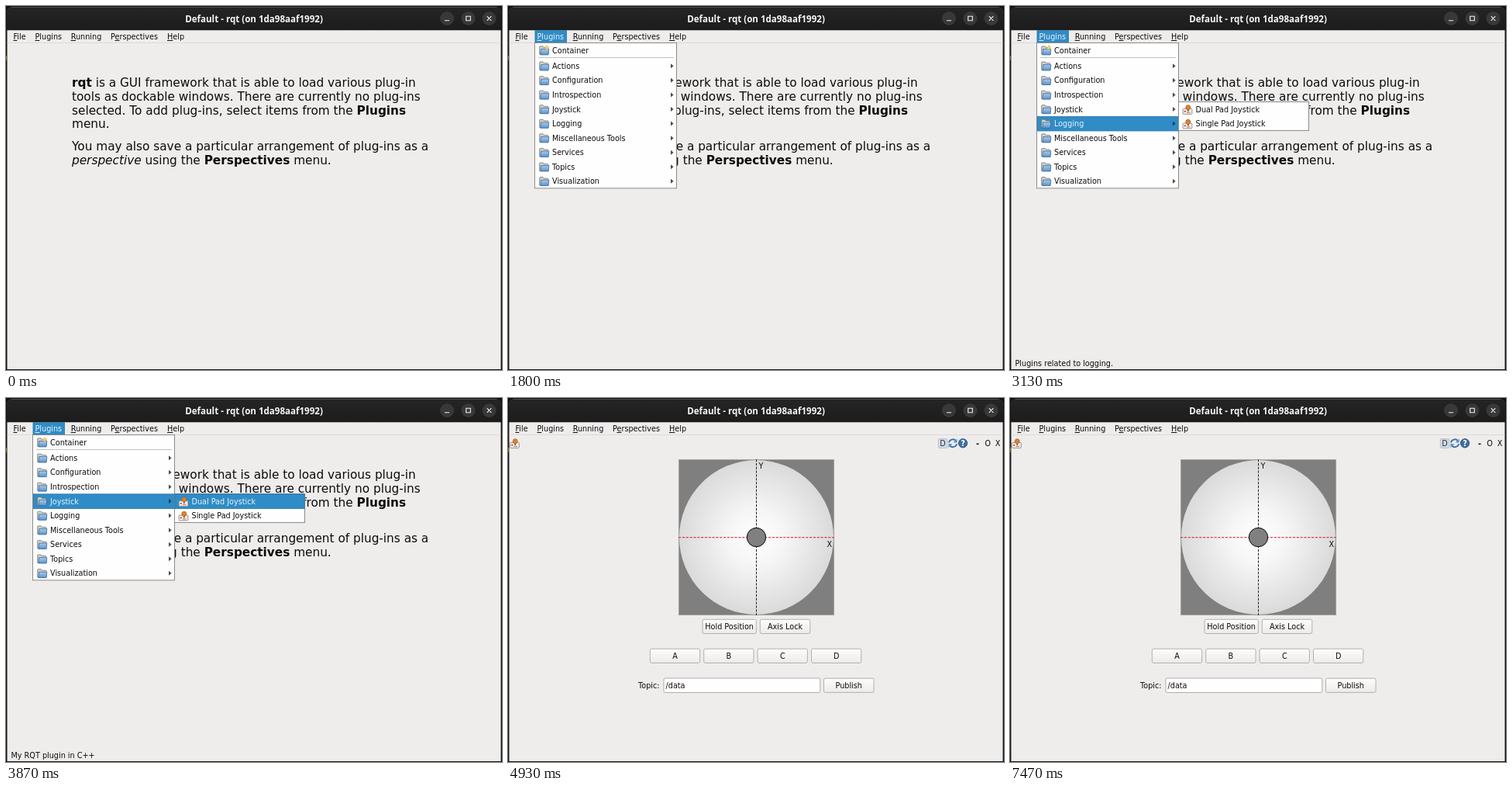
Animation of 640 by 469 pixels, one loop 8000 ms. Source, as an HTML page:

```html
<!DOCTYPE html>
<html lang="en">
<head>
<meta charset="utf-8">
<title>rqt joystick plugin</title>
<style>
  html, body { margin: 0; width: 100%; height: 100%; overflow: hidden; background: #121110; }
  svg { display: block; width: 640px; height: 469px; }
  text { font: 9.66px "DejaVu Sans", sans-serif; fill: #0c0c0c; white-space: pre; }
  .title { font: bold 11.57px "Open Sans", sans-serif; fill: #f6f6f6; }
  .welcome text { font-size: 15.3px; }
  .key { text-decoration: underline; text-decoration-thickness: .8px; }
  .mid { text-anchor: middle; }
  .bold { font-weight: bold; }
  .italic { font-style: italic; }
  .hot text { fill: #e9f3fa; }
  .bar { fill: #308cc6; stroke: #2774a6; stroke-width: .8; visibility: hidden; }
  .hot .bar { visibility: visible; }
  .hot .arrow { fill: #1b3f58; }
  .arrow { fill: #4a4a4a; }
  .popup { fill: #fefefe; stroke: #8d8b8a; }
  .button { fill: url(#face); stroke: #adaaa8; stroke-width: .9; }
</style>
</head>
<body>
<svg viewBox="0 0 640 469" xmlns="http://www.w3.org/2000/svg">
  <defs>
    <linearGradient id="titlebar" x2="0" y2="1">
      <stop stop-color="#252525"/><stop offset="1" stop-color="#1c1c1c"/>
    </linearGradient>
    <linearGradient id="face" x2="0" y2="1">
      <stop stop-color="#fdfdfc"/><stop offset="1" stop-color="#ecebe9"/>
    </linearGradient>
    <linearGradient id="folderFront" x2="0" y2="1">
      <stop stop-color="#a9cbec"/><stop offset="1" stop-color="#5b92c9"/>
    </linearGradient>
    <radialGradient id="pad">
      <stop stop-color="#ffffff"/><stop offset=".35" stop-color="#f6f6f6"/><stop offset="1" stop-color="#dadada"/>
    </radialGradient>
    <g id="folder">
      <path d="M.7 11V1.6q0-.9.9-.9h3.6l1.2 1.6h4.6q.8 0 .8.8V11z" fill="#d2d2cf" stroke="#6f716e" stroke-width=".8"/>
      <path d="M2.6 4.3h10.2l-.7 7.4H1.8z" fill="url(#folderFront)" stroke="#3a699b" stroke-width=".8"/>
    </g>
    <g id="stick">
      <rect x=".6" y="5.4" width="11.8" height="7" rx="1" fill="#f2eee9" stroke="#8f8a86" stroke-width=".9"/>
      <path d="M7.3 5v4" stroke="#6b5548" stroke-width="1.6"/>
      <circle cx="7.3" cy="3.7" r="3" fill="#e0822c" stroke="#a9541a" stroke-width=".7"/>
      <circle cx="3.3" cy="8.8" r="1.1" fill="#c33d2c"/>
      <path d="M5.6 10.4h4.2" stroke="#c06a3c"/>
    </g>
  </defs>

  <path d="M1.5 468V8q0-6.5 6.5-6.5h624q6.500 0 6.500 6.500V468z" fill="#efedec"/>
  <path d="M1 31.300V8q0-6.500 6.500-6.500h625q6.500 0 6.500 6.500v23.300z" fill="url(#titlebar)"/>
  <rect y="64" width="1" height="6" fill="#7a6420"/>
  <text class="title mid" x="320" y="21">Default - rqt (on 1da98aaf1992)</text>
  <g fill="#383838">
    <circle cx="569" cy="16" r="9"/><circle cx="596.500" cy="16" r="9"/><circle cx="623.500" cy="16" r="9"/>
  </g>
  <path d="M566 18.700h6M593.700 13.200h5.600v5.600h-5.600zM620.700 13.200l5.600 5.600m0-5.600l-5.600 5.600"
        fill="none" stroke="#f4f4f4" stroke-width="1.100"/>
  <path d="M1.500 47.500h637" stroke="#d9d7d5" stroke-width=".8"/>
  <g id="menubar"></g>

  <g id="welcome" class="welcome">
    <text x="85" y="104"><tspan class="bold">rqt</tspan> is a GUI framework that is able to load various plug-in</text>
    <text x="85" y="121.800">tools as dockable windows. There are currently no plug-ins</text>
    <text x="85" y="139.500">selected. To add plug-ins, select items from the <tspan class="bold">Plugins</tspan></text>
    <text x="85" y="157.300">menu.</text>
    <text x="85" y="185.700">You may also save a particular arrangement of plug-ins as a</text>
    <text x="85" y="203.500"><tspan class="italic">perspective</tspan> using the <tspan class="bold">Perspectives</tspan> menu.</text>
  </g>

  <g id="plugin">
    <use href="#stick" x="2" y="52"/>
    <rect x="555.300" y="52.500" width="11.600" height="12" rx="1.500" fill="#d5dade" stroke="#b4b8bb" stroke-width=".8"/>
    <text class="mid" x="561" y="62" style="fill:#173a5e">D</text>
    <g fill="none" stroke="#3b72aa" stroke-width="1.900">
      <path d="M569 57.500a5 4.600 0 0 1 8.800-2.500M579 59a5 4.600 0 0 1-8.800 2.500"/>
    </g>
    <path d="M579.500 52.500v5h-5zM568.500 64v-5h5z" fill="#5b94cc"/>
    <circle cx="587" cy="58.300" r="5.700" fill="#3f6fa3" stroke="#24486f" stroke-width=".8"/>
    <text class="mid bold" x="587" y="61.800" style="fill:#fff">?</text>
    <text class="mid bold" x="606" y="62">-</text>
    <text class="mid" x="619" y="62">O</text>
    <text class="mid" x="632" y="62">X</text>

    <rect x="220.300" y="79.300" width="200.400" height="200.400" fill="#7f7f7f" stroke="#a5a5a5" stroke-width=".7"/>
    <circle cx="320.500" cy="179.500" r="99.500" fill="url(#pad)"/>
    <path d="M320.500 79v201" stroke="#222" stroke-dasharray="3.220 1.610"/>
    <path d="M220 179.700h201" stroke="#d01c30" stroke-dasharray="3.220 1.610"/>
    <text x="323.500" y="91">Y</text>
    <text x="411.500" y="192">X</text>
    <circle id="knob" cx="320.500" cy="179.500" r="12.200" fill="#808080" stroke="#0a0a0a"/>

    <g id="buttons"></g>
    <text x="168" y="374">Topic:</text>
    <rect x="201" y="361" width="201.800" height="18.500" rx="2" fill="#fff" stroke="#a8a5a3" stroke-width=".9"/>
    <text x="203.500" y="374">/data</text>
  </g>

  <g id="menu"><rect class="popup" x="34.500" y="47.500" width="183" height="187.300"/></g>
  <g id="submenu"><rect class="popup" x="217.500" y="123.500" width="168" height="37"/></g>
  <text id="status" x="6.500" y="463.500"></text>
</svg>
<script>
const LOOP = 8000;
const ROW = 18.57;
const $ = id => document.getElementById(id);

function add(parent, tag, attrs = {}, text = '') {
  const node = document.createElementNS('http://www.w3.org/2000/svg', tag);
  for (const [name, value] of Object.entries(attrs)) node.setAttribute(name, value);
  node.textContent = text;
  return parent.appendChild(node);
}

function addMenuTitle(label, x, keyIndex = 0) {
  const group = add($('menubar'), 'g');
  if (label === 'Plugins') add(group, 'rect', { class: 'bar', x: 35, y: 31.7, width: 40.5, height: 15.6 });
  const text = add(group, 'text', { x, y: 43 });
  add(text, 'tspan', {}, label.slice(0, keyIndex));
  add(text, 'tspan', { class: 'key' }, label[keyIndex]);
  add(text, 'tspan', {}, label.slice(keyIndex + 1));
  return group;
}

function addRow(menu, label, left, width, middle, icon) {
  const group = add(menu, 'g');
  add(group, 'rect', { class: 'bar', x: left + .4, y: middle - 9.2, width, height: ROW });
  add(group, 'use', { href: icon, x: left + 5, y: middle - 6 });
  add(group, 'text', { x: left + 22, y: middle + 3.5 }, label);
  return group;
}

function addButton(label, x, y, width) {
  add($('buttons'), 'rect', { class: 'button', x, y, width, height: 18.2, rx: 2 });
  add($('buttons'), 'text', { class: 'mid', x: x + width / 2, y: y + 12.8 }, label);
}

addMenuTitle('File', 9.5);
const pluginsTitle = addMenuTitle('Plugins', 37.5);
addMenuTitle('Running', 83.7);
addMenuTitle('Perspectives', 135, 1);
addMenuTitle('Help', 208);

const rows = { Container: addRow($('menu'), 'Container', 35, 182, 57.2, '#folder') };
add(rows.Container, 'path', { d: 'M50 50.500l1 2 2 .3-1.500 1.500.4 2.200-1.900-1-1.900 1 .4-2.200-1.500-1.500 2-.3z', fill: '#f3d672', stroke: '#c79a35', 'stroke-width': .4 });
add($('menu'), 'path', { d: 'M39 66.500h175', stroke: '#c2c0bf' });
['Actions', 'Configuration', 'Introspection', 'Joystick', 'Logging',
  'Miscellaneous Tools', 'Services', 'Topics', 'Visualization'].forEach((label, i) => {
  const middle = 77.3 + i * ROW;
  rows[label] = addRow($('menu'), label, 35, 182, middle, '#folder');
  add(rows[label], 'path', { class: 'arrow', d: `M210 ${middle - 3}l3.600 3-3.600 3z` });
});
['Dual', 'Single'].forEach((name, i) => {
  rows[name] = addRow($('submenu'), `${name} Pad Joystick`, 217.5, 167.2, 133 + i * ROW, '#stick');
});

addButton('Hold Position', 251, 285.3, 69.3);
addButton('Axis Lock', 325.3, 285.3, 64.5);
['A', 'B', 'C', 'D'].forEach((label, i) => addButton(label, 183.3 + i * 69.4, 323.2, 64.3));
addButton('Publish', 407.5, 361.2, 64.5);

// Hovered menu row from each time on
const hovers = [
  [0, ''], [2070, 'Container'], [2130, 'Actions'], [2200, 'Configuration'],
  [2270, 'Introspection'], [2330, 'Joystick'], [3130, 'Logging'], [3200, 'Single'],
  [3400, 'Dual'], [3930, 'Single'], [4130, 'Dual'], [4400, 'Single'], [4870, '']
];

// Knob offset from the centre of the pad
const drags = [
  [0, 0, 0], [6930, 5, -8], [7000, 14, -24], [7070, 22, -38],
  [7130, 26, -45], [7330, 26.5, -45.5], [7470, 0, 0]
];

const at = (track, time) => track.findLast(([start]) => time >= start);
const show = (id, visible) => { $(id).style.display = visible ? '' : 'none'; };

function statusFor(row) {
  if (row === '' || row === 'Container') return '';
  if (row === 'Dual' || row === 'Single') return 'My RQT plugin in C++';
  return `Plugins related to ${row.toLowerCase()}.`;
}

function draw(time) {
  const menuOpen = time >= 1800 && time < 4870;
  const loaded = time >= 4930;
  const [, hover] = at(hovers, time);
  const inSubmenu = hover === 'Dual' || hover === 'Single';
  const [, dx, dy] = at(drags, time);

  pluginsTitle.classList.toggle('hot', menuOpen);
  show('menu', menuOpen);
  show('submenu', menuOpen && time >= 2600);
  show('welcome', !loaded);
  show('plugin', loaded);
  for (const [name, row] of Object.entries(rows)) {
    row.classList.toggle('hot', name === hover || (inSubmenu && name === 'Joystick'));
  }
  $('status').textContent = statusFor(hover);
  $('knob').setAttribute('transform', `translate(${dx} ${dy})`);
}

const begin = performance.now();
function tick() {
  draw((performance.now() - begin) % LOOP);
  requestAnimationFrame(tick);
}
tick();
</script>
</body>
</html>
```
